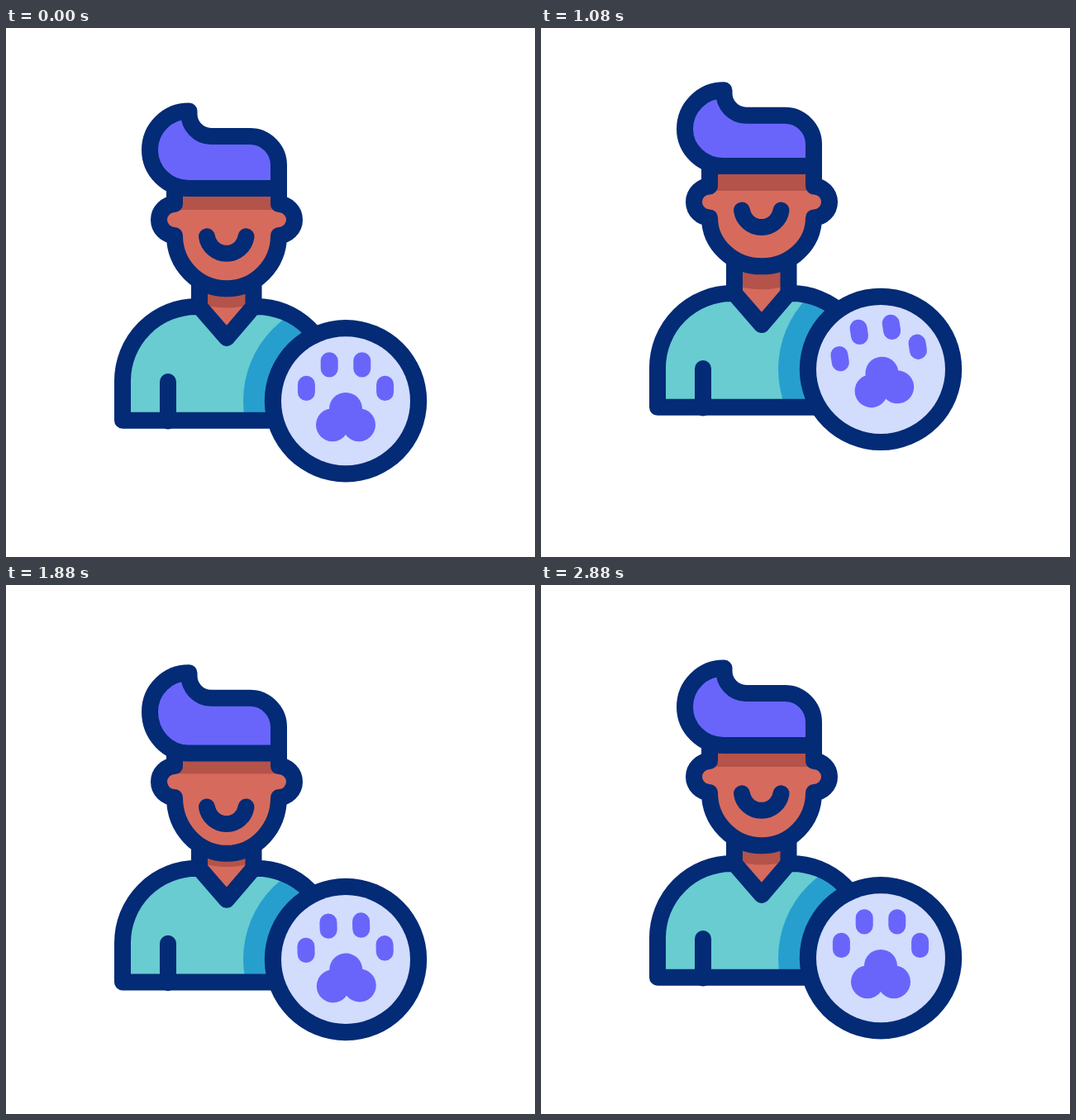
Animation, 640 px wide and 640 px high, one loop 3 s. Source, as an HTML page with a canvas:

```html
<!DOCTYPE html>
<html lang="en">
<head>
<meta charset="utf-8">
<title>Pet owner</title>
<style>
  html, body { margin: 0; width: 100%; height: 100%; overflow: hidden; background: #fff; }
  canvas { display: block; width: 640px; height: 640px; }
</style>
</head>
<body>
<canvas id="stage" width="640" height="640"></canvas>
<script>
const ctx = document.getElementById('stage').getContext('2d');
const LOOP = 3000, STEP = 40;
const NAVY = '#032b76', SKIN = '#d66b5d', SKIN_DARK = '#b45349', TEAL = '#68ccd1',
      BLUE = '#279fce', PURPLE = '#6965fb', PALE = '#d2dcfd';

// Key times (ms); every track starts and ends at zero.
const FIGURE_TIMES = [200, 980, 1580, 2235, 2800];
const BADGE_TIMES = [200, 600, 1080, 1600, 2120, 2880];
const PAW_TIMES = BADGE_TIMES.map((t, i) => i > 0 && i < 5 ? t + 15 : t);
const TURN_TIMES = [200, 880, 1560, 2240, 2880];

// Extremes reached at the inner key times.
const TRACKS = {
  body: [FIGURE_TIMES, [-18.6, 18, -9.8]],
  hair: [FIGURE_TIMES, [-28.7, 18, -9.8]],
  face: [FIGURE_TIMES, [-31, 24, -9]],
  ears: [FIGURE_TIMES, [-24.8, 18.3, -9.6]],
  brow: [FIGURE_TIMES, [-26.5, 22, -9.5]],
  smile: [FIGURE_TIMES, [-37.2, 36, -9.3]],
  neck: [FIGURE_TIMES, [-25, 12, -9.7]],
  badge: [BADGE_TIMES, [16.5, -38.3, 26.5, -17.8]],
  paw: [PAW_TIMES, [22.4, -43.3, 34, -23]],
  turn: [TURN_TIMES, [-12.6, 6, -10.5]]
};

function track([times, extremes], t) {
  const values = [0, ...extremes, 0];
  for (let i = 1; i < times.length; i++) {
    if (t >= times[i]) continue;
    const u = Math.max(0, (t - times[i - 1]) / (times[i] - times[i - 1]));
    return values[i - 1] + (values[i] - values[i - 1]) * u * u * (3 - 2 * u);
  }
  return 0;
}

function fill(d, color) {
  ctx.fillStyle = color;
  ctx.fill(new Path2D(d));
}

function stroke(d, color = NAVY, width = 20) {
  ctx.strokeStyle = color;
  ctx.lineWidth = width;
  ctx.stroke(new Path2D(d));
}

function disc(x, y, r, color) {
  ctx.fillStyle = color;
  ctx.beginPath();
  ctx.arc(x, y, r, 0, Math.PI * 2);
  ctx.fill();
}

function drawBody(p, badgeY) {
  const chin = 310 + p.face, collar = 337 + p.body, hem = 474.7 + p.body;
  const shade = 333.5 + p.neck;
  fill(`M234 ${chin}H299.5V${collar}L267 ${collar + 38}L234 ${collar}Z`, SKIN);
  fill(`M234 ${chin - 20}H299.5V${shade}Q267 ${shade + 10} 234 ${shade}Z`, SKIN_DARK);
  stroke(`M234 ${chin}V${collar}M299.5 ${chin}V${collar}`);

  const shirt = `M141 ${hem}V${collar + 90}A90 90 0 0 1 231 ${collar}H234
    L267 ${collar + 38}L299.5 ${collar}H303A90 90 0 0 1 393 ${collar + 90}V${hem}Z`;
  fill(shirt, TEAL);
  ctx.save();
  ctx.clip(new Path2D(shirt));
  disc(411, badgeY, 124, BLUE);
  ctx.restore();
  stroke(shirt);
  stroke(`M196 ${collar + 91}V${hem + 0.7}`);
}

function drawHead(p) {
  const band = 194 + p.face, earTop = 213 + p.ears, earBottom = earTop + 38;
  const jaw = 315.3 + p.face - earBottom;
  const head = `M204 ${band}V${earTop}A19 19 0 0 0 204 ${earBottom}
    A63 ${jaw} 0 0 0 330 ${earBottom}A19 19 0 0 0 330 ${earTop}V${band}`;
  fill(head, SKIN);
  fill(`M204 ${band}H330V${220 + p.brow}H204Z`, SKIN_DARK);
  stroke(head);

  const lip = 252.3 + p.smile;
  stroke(`M243 ${lip}A24 24 0 0 0 290.5 ${lip}`);

  const top = 100.5 + p.hair, side = top + 47;
  const hair = `M221.5 ${top}V${top + 3}A27 27 0 0 0 248 ${top + 30.5}H295
    A35 35 0 0 1 330 ${top + 65.5}V${band}H221
    A47 ${band - side} 0 0 1 174 ${side}A47 47 0 0 1 221.5 ${top}Z`;
  fill(hair, PURPLE);
  stroke(hair);
}

function drawBadge(y, pawY, turn) {
  disc(411, y, 98.2, NAVY);
  disc(411, y, 78, PALE);
  ctx.save();
  ctx.translate(411, pawY);
  ctx.rotate(turn * Math.PI / 180);
  for (const side of [-1, 1]) {
    stroke(`M${side * 47.6} -20v9.4M${side * 19.8} -48.5v9.4`, PURPLE, 21);
    disc(side * 16, 29, 20, PURPLE);
  }
  disc(0, 9.7, 20, PURPLE);
  ctx.restore();
}

function draw(now) {
  const t = Math.floor((now % LOOP) / STEP) * STEP;
  const p = {};
  for (const name in TRACKS) p[name] = track(TRACKS[name], t);
  const badgeY = 451.2 + p.badge;

  ctx.fillStyle = '#fff';
  ctx.fillRect(0, 0, 640, 640);
  ctx.lineCap = ctx.lineJoin = 'round';
  drawBody(p, badgeY);
  drawHead(p);
  drawBadge(badgeY, 451.2 + p.paw, p.turn);
  requestAnimationFrame(draw);
}

requestAnimationFrame(draw);
</script>
</body>
</html>
```
